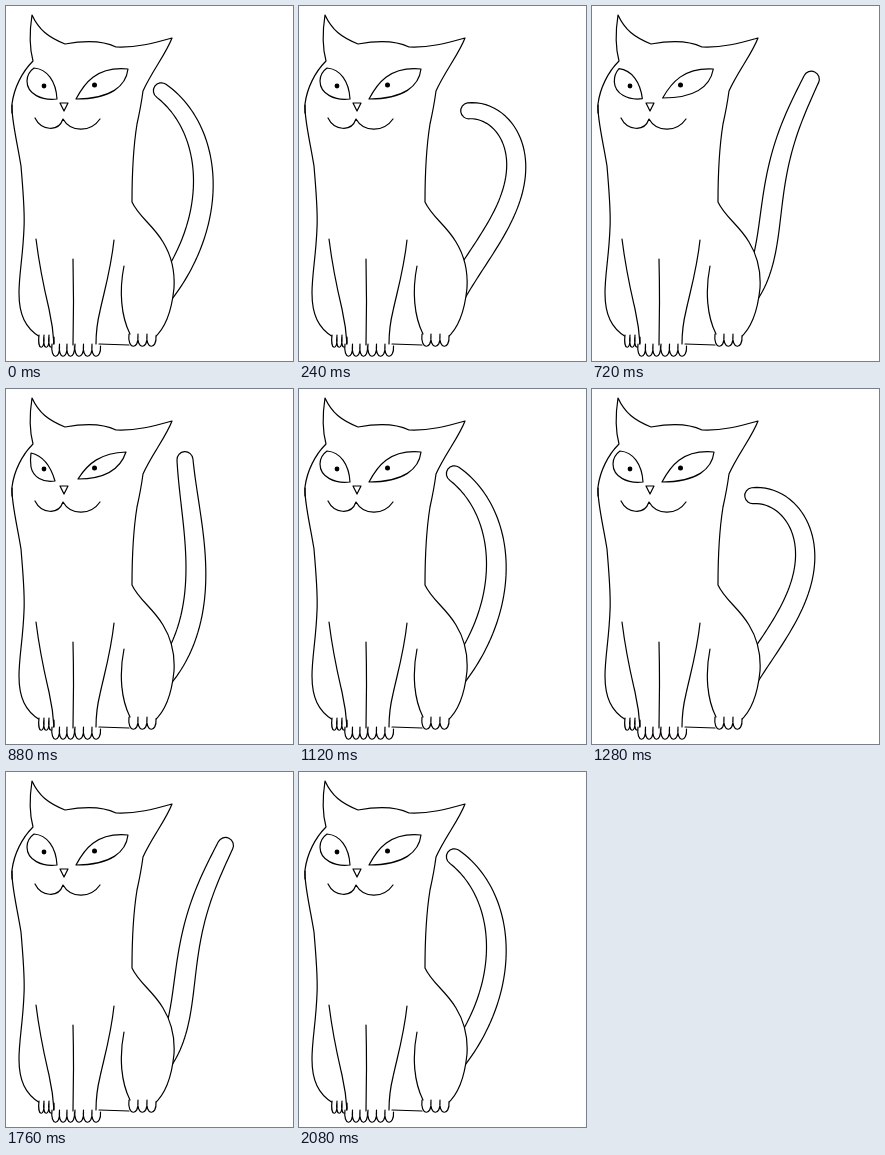
Write an HTML page that moves like this. It is 287x355 px and loops after 2160 ms.

```html
<!DOCTYPE html>
<html lang="en">
<head>
<meta charset="utf-8">
<title>Cat wagging its tail</title>
<style>
  html, body { margin: 0; width: 100%; height: 100%; overflow: hidden; background: #fff; }
  svg { display: block; width: 100vw; height: 100vh; }
  path { fill: none; stroke: #000; stroke-width: 1.2; stroke-linecap: round; stroke-linejoin: round; }
  .solid { fill: #fff; }
</style>
</head>
<body>
<svg viewBox="0 0 287 355">
  <path id="tail" class="solid"/>
  <!-- body and head -->
  <path class="solid" d="M34 331C19 322 13 308 13 287C13 268 17 250 18 222C19 205 17 185 15 160
    C11 135 5 112 6 98C8 82 16 66 27 55C23 40 24 22 26 9C33 24 42 31 59 38C75 35 96 34 110 41
    C130 42 148 37 166 32C160 48 146 65 137 85Q135 100 131 118C127 143 126 165 126 196
    C133 211 147 219 157 236C165 249 169 265 168 282C166 302 161 321 148 332M123 339L93 338"/>
  <path d="M6 99V107" stroke-width="2"/>
  <g id="paws"></g>
  <!-- legs -->
  <path d="M30 233C33 257 38 282 43 303Q47 321 48 338M67 253Q68 296 67 339M108 234C105 263 98 286 94 305
    Q90 321 90 338M118 260C113 285 115 310 124 328"/>
  <!-- face -->
  <path id="leftEye"/>
  <path id="rightEye"/>
  <circle cx="38" cy="80" r="2.4"/>
  <circle cx="88.5" cy="79" r="2.5"/>
  <path d="M54 97H62L58 105ZM29 112C35 124 52 127 57 113C65 127 85 126 94 113"/>
</svg>
<script>
const STEP = 80, STEPS = 27;
const $ = id => document.getElementById(id);

// Tail headings in degrees from upright, evenly spaced from root to tip.
const left = [38, 16, -13, -55], hook = [30, 30, -6, -98], rise = [31, 9, 27, 31],
      right = [30, 6, 37, 46], upright = [40, 10, -6, -4];
const keys = [
  [0, left], [3, hook], [5, rise], [7, right], [11, upright],
  [14, left], [17, hook], [19, rise], [20, right], [24, upright], [26, left]
];
const keyAt = i => {
  const lap = Math.floor(i / keys.length), [at, pose] = keys[i - lap * keys.length];
  return { at: at + lap * STEPS, pose };
};

// Smooth interpolation through the keys, wrapping around the loop.
function headingsAt(step) {
  let k = 0;
  while (keyAt(k + 1).at <= step) k++;
  if (k === keys.length - 1) return left;
  const [a, b, c, d] = [-1, 0, 1, 2].map(i => keyAt(k + i));
  const span = c.at - b.at, u = (step - b.at) / span;
  return b.pose.map((from, i) => {
    const to = c.pose[i];
    const m = (to - a.pose[i]) / (c.at - a.at) * span, n = (d.pose[i] - from) / (d.at - b.at) * span;
    return from + (to - from) * u * u * (3 - 2 * u) + u * (1 - u) * (m * (1 - u) - n * u);
  });
}

// Cubic through four evenly spaced headings.
function headingAlong([a, b, c, d], s) {
  const u = 3 * s;
  return a + (b - a) * u + (c - 2 * b + a) * u * (u - 1) / 2
    + (d - 3 * c + 3 * b - a) * u * (u - 1) * (u - 2) / 6;
}

function tailPath(headings) {
  const count = 60, length = 228, near = [], far = [];
  let x = 155, y = 290, r;
  for (let i = 0; i <= count; i++) {
    const s = i / count, angle = headingAlong(headings, s) * Math.PI / 180;
    const dx = Math.sin(angle), dy = -Math.cos(angle);
    r = 10.6 - 2.6 * s * s;
    near.push(`${(x + dy * r).toFixed(2)} ${(y - dx * r).toFixed(2)}`);
    far.unshift(`${(x - dy * r).toFixed(2)} ${(y + dx * r).toFixed(2)}`);
    x += dx * length / count;
    y += dy * length / count;
  }
  return `M${near.join("L")}A${r} ${r} 0 0 1 ${far.join("L")}`;
}

// A paw is a row of overlapping round toes.
function paw(x, top, height, toes, width) {
  let d = "";
  for (let i = 0; i < toes; i++, x += width) {
    const low = top + height * 4 / 3;
    d += `M${x} ${top}C${x - 2} ${low} ${x + width + 1} ${low} ${x + width} ${top + 2}`;
  }
  return `<path class="solid" d="${d}"/>`;
}
$("paws").innerHTML = paw(33, 329, 12, 3, 5) + paw(123, 328, 12, 3, 9)
  + paw(46, 338, 12, 3, 7.5) + paw(69, 338, 12, 3, 8.5);

// Blend the numbers of two paths that share the same commands.
function blend(from, to, u) {
  const end = to.match(/\d+/g);
  let i = 0;
  return from.replace(/\d+/g, n => +n + (end[i++] - n) * u);
}
const eyes = {
  leftEye: ["M28 62C41 63 50 75 51 93C36 95 21 88 21 75Q21 67 28 62Z",
            "M25 64C38 67 45 78 49 92C37 94 27 88 25 78Q24 71 25 64Z"],
  rightEye: ["M70 93C78 78 90 60 122 63C120 80 105 93 70 93Z",
             "M72 90C82 74 95 64 120 63C115 78 103 90 72 90Z"]
};

function draw(step) {
  $("tail").setAttribute("d", tailPath(headingsAt(step)));
  const squint = Math.max(0, 1 - Math.abs(step - 11) / 3);
  for (const id in eyes) $(id).setAttribute("d", blend(...eyes[id], squint));
}

function tick() {
  draw(Math.floor(performance.now() / STEP) % STEPS);
  requestAnimationFrame(tick);
}
tick();
</script>
</body>
</html>
```
